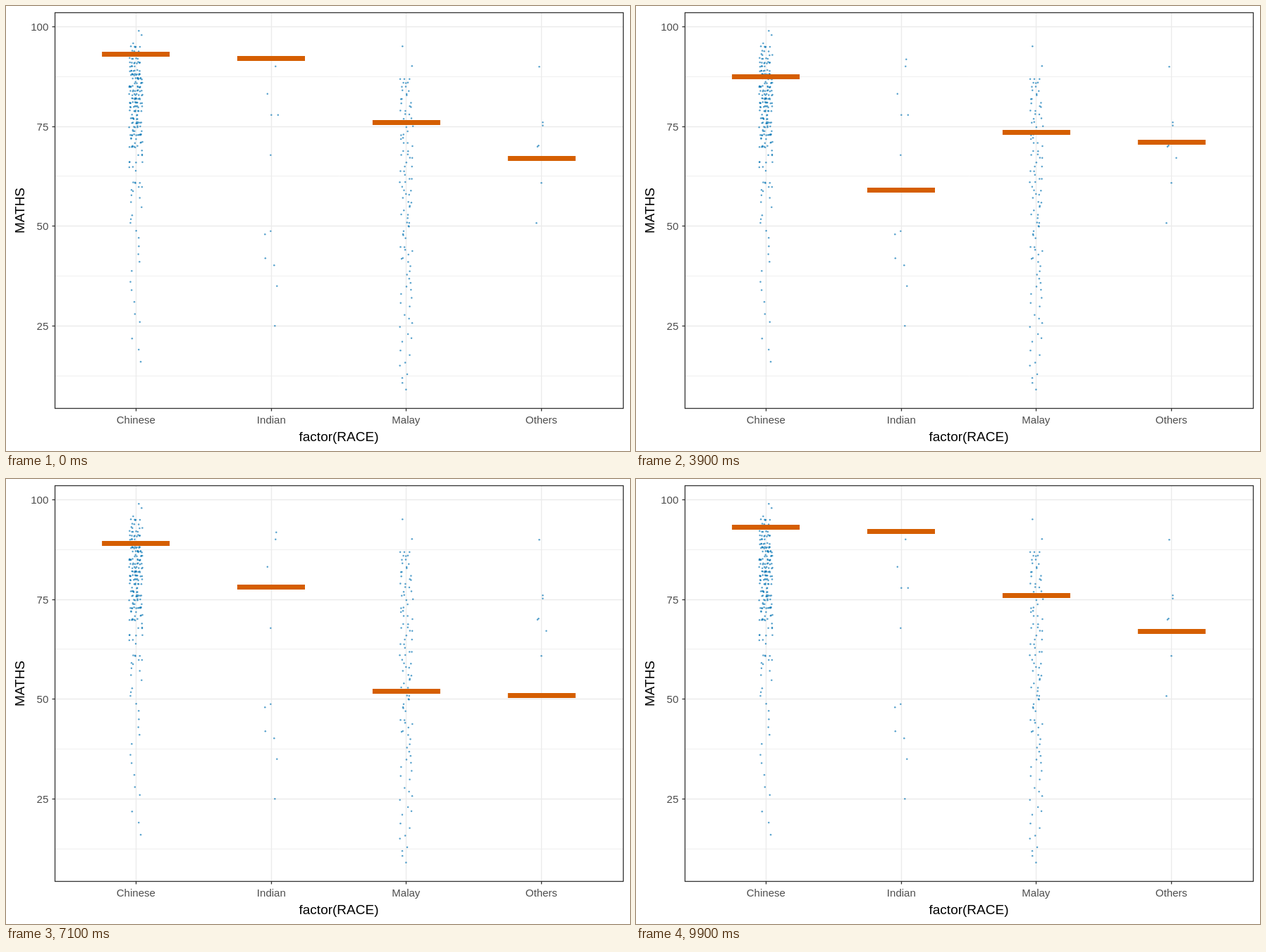
Write an HTML page with a canvas that moves like this. It is 885 px wide and 632 px high and loops after 10 s.

```html
<!DOCTYPE html>
<html lang="en">
<head>
<meta charset="utf-8">
<title>Maths scores by group</title>
<style>
  html, body { margin: 0; width: 100%; height: 100%; overflow: hidden; background: #fff; }
  canvas { display: block; }
</style>
</head>
<body>
<canvas id="stage" width="885" height="632"></canvas>
<script>
const FONT = '"Liberation Sans", Arial, sans-serif';
const GROUPS = ['Chinese', 'Indian', 'Malay', 'Others'];
const LEFT = 69.5, TOP = 9.5, RIGHT = 875.5, BOTTOM = 571.5;

const groupX = i => 184.1 + i * 191.9;
const scoreY = v => 29.2 + (100 - v) * 5.673;
const snap = v => Math.floor(v) + 0.5;

// Bar score per group for each step; a gap keeps the previous score
const STEPS = [
  [93, 92, 76, 67], [94, 48, , 61], [91, 92], [36, , 90], [78, 40, 66],
  [80, 78, , 90], [86, , 37], [79, 35, 63, 70], [78, 92, , 75], [92, 35, 79],
  [83, 83, 68, 67], [90, , 20, 76], [80, , 58, 70], [77, 68, 63], [86, 78, 49, 67],
  [97, , 58], [78, , 9], [93, , 60, 75], [89, , 52, 51], [91, , 70, 61],
  [92, , 66, 70], [78, , , 67], [85, 68, 36, 75], [98, 35, 52, 90], [80, 68, 59, 76]
];
for (let s = 1; s < STEPS.length; s++)
  STEPS[s] = GROUPS.map((_, i) => STEPS[s][i] ?? STEPS[s - 1][i]);

// Small groups and outliers as x, y pairs
const LONE = [
  [188, 35], [192, 41], [562, 57], [575.5, 85],
  [383, 75.5], [382, 85.5], [370.5, 124.5], [376, 154.5], [385.5, 154.5], [375, 211.5],
  [375, 319.5], [367, 324], [367.5, 358], [380, 368], [384, 397.5], [381, 454],
  [756, 86], [761, 165], [761, 169.5], [753.5, 199.5], [755, 198], [766, 215.5],
  [759, 251], [752, 308]
];

function makeRandom(seed) {
  return () => {
    seed = (seed * 16807) % 2147483647;
    return seed / 2147483647;
  };
}

function label(c, text, x, y, size, color, align) {
  c.font = size + 'px ' + FONT;
  c.fillStyle = color;
  c.textAlign = align;
  c.fillText(text, x, y);
}

function line(c, x1, y1, x2, y2, color, width) {
  c.strokeStyle = color;
  c.lineWidth = width;
  c.beginPath();
  c.moveTo(x1, y1);
  c.lineTo(x2, y2);
  c.stroke();
}

function dot(c, x, y) {
  c.beginPath();
  c.arc(x + 0.3, y + 0.3, 1.25, 0, Math.PI * 2);
  c.fill();
}

function drawAxes(c) {
  c.fillStyle = '#fff';
  c.fillRect(0, 0, c.canvas.width, c.canvas.height);
  for (let v = 12.5; v <= 100; v += 12.5) {
    const y = snap(scoreY(v));
    const major = v % 25 === 0;
    line(c, LEFT, y, RIGHT, y, '#ebebeb', major ? 1.4 : 0.8);
    if (major) {
      line(c, LEFT - 4, y, LEFT, y, '#333', 1.3);
      label(c, String(v), 60.3, y + 5.5, 15, '#4d4d4d', 'right');
    }
  }
  GROUPS.forEach((name, i) => {
    const x = snap(groupX(i));
    line(c, x, TOP, x, BOTTOM, '#ebebeb', 1.4);
    line(c, x, BOTTOM, x, BOTTOM + 4, '#333', 1.3);
    label(c, name, x - 0.2, 592.5, 15, '#4d4d4d', 'center');
  });
  c.strokeStyle = '#333';
  c.lineWidth = 1.3;
  c.strokeRect(LEFT, TOP, RIGHT - LEFT, BOTTOM - TOP);
  label(c, 'factor(RACE)', 472, 618, 19, '#000', 'center');
  c.save();
  c.translate(25.5, 290.5);
  c.rotate(-Math.PI / 2);
  label(c, 'MATHS', 0, 0, 19, '#000', 'center');
  c.restore();
}

function drawPoints(c) {
  const rnd = makeRandom(4711);
  const jitter = (i, score) =>
    dot(c, groupX(i) - 0.3 + (rnd() - 0.5) * 19, scoreY(Math.round(score) + (rnd() - 0.5) * 0.4));
  // Spreads points from a high to a low score; the power thins out the low end
  const spread = (i, count, high, low, power) => {
    for (let k = 0; k < count; k++)
      jitter(i, high - (high - low) * Math.pow(k / (count - 1), power));
  };

  c.fillStyle = 'rgba(0, 114, 178, 0.65)';
  LONE.forEach(([x, y]) => dot(c, x, y));
  for (let k = 0; k < 190; k++)
    jitter(0, 97.4 - 35.5 * Math.pow((rnd() + rnd()) / 2, 1.2));
  spread(0, 29, 61, 16, 2.1);
  spread(2, 74, 87.4, 47, 1.15);
  spread(2, 34, 45, 9, 1.4);
}

const stage = document.getElementById('stage');
const ctx = stage.getContext('2d');
const backdrop = stage.cloneNode();
const back = backdrop.getContext('2d');
drawAxes(back);
drawPoints(back);

// Each step holds for three ticks, then shows one halfway tick; one hold is a tick short
function draw(ms) {
  const tick = Math.floor((ms % 10000) / 100);
  const pos = tick < 50 ? tick : tick + 1;
  const step = Math.floor(pos / 4);
  const from = STEPS[step % STEPS.length];
  const to = STEPS[(step + 1) % STEPS.length];
  const mix = pos % 4 === 3 ? 0.5 : 0;

  ctx.drawImage(backdrop, 0, 0);
  ctx.fillStyle = '#d55e00';
  from.forEach((v, i) => {
    const y = scoreY(v + (to[i] - v) * mix);
    ctx.fillRect(groupX(i) - 48, Math.round(y - 3.6), 96, 7);
  });
}

const start = performance.now();
function loop(now) {
  draw(Math.max(0, now - start));
  requestAnimationFrame(loop);
}
draw(0);
requestAnimationFrame(loop);
</script>
</body>
</html>
```
